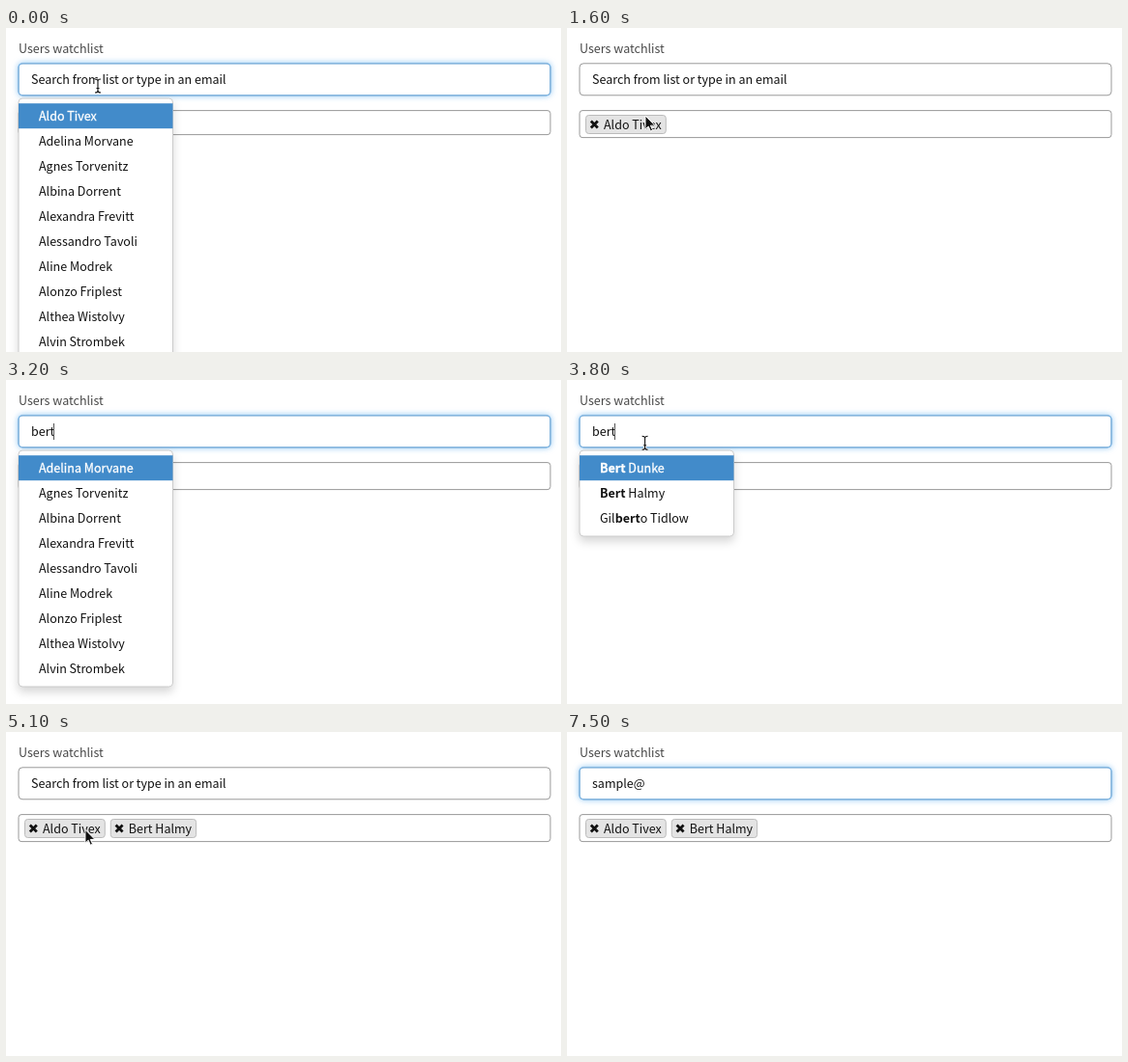
Animation, 574 px wide and 336 px high, one loop 8000 ms. Source, as an HTML page:

```html
<!DOCTYPE html>
<html lang="en">
<head>
<meta charset="utf-8">
<title>Users watchlist</title>
<style>
  html, body { margin: 0; width: 100%; height: 100%; overflow: hidden; background: #fff; }
  svg { display: block; width: 574px; height: 336px; font: 12.53px "Noto Sans CJK SC", "Noto Sans CJK JP", "Noto Sans", sans-serif; fill: #111; }
  .menu { filter: drop-shadow(0 5px 5px rgba(0, 0, 0, .16)); }
  .active text { fill: #fff; stroke: #fff; stroke-width: .3px; }
</style>
</head>
<body>
<svg id="stage" viewBox="0 0 574 336"></svg>
<script>
const LOOP = 8000, STEP = 100, ROW = 26, MENU_TOP = 78.2;
const PLACEHOLDER = 'Search from list or type in an email';
const PEOPLE = ['Aldo Tivex', 'Adelina Morvane', 'Agnes Torvenitz', 'Albina Dorrent', 'Alexandra Frevitt',
  'Alessandro Tavoli', 'Aline Modrek', 'Alonzo Friplest', 'Althea Wistolvy', 'Alvin Strombek'];
const MATCHES = ['Bert Dunke', 'Bert Halmy', 'Gilberto Tidlow'];

// Each entry: [time, value]; the value holds until the next entry.
const INPUT = [[0, ''], [2700, 'b'], [2800, 'be'], [3000, 'ber'], [3100, 'bert'], [4600, ''], [6400, 's'],
  [6800, 'sa'], [6900, 'sam'], [7000, 'samp'], [7100, 'sampl'], [7200, 'sample'], [7400, 'sample@']];
const MENU = [[0, PEOPLE], [1300, []], [2600, PEOPLE.slice(1)], [3500, MATCHES], [4600, []]];
const PILLS = [[0, []], [1300, [PEOPLE[0]]], [4600, [PEOPLE[0], MATCHES[1]]]];
const CARET = [[0, false], [2500, true], [4500, false], [5900, true], [7500, false]];
const MOUSE_SHOWN = [[0, true], [2600, false], [3700, true], [5900, false]];

// Each entry: [time, ...numbers]; numbers ease from one entry to the next.
const FOCUS = [[0, 1], [800, 1], [1100, 0], [2200, 0], [2400, 1], [4500, 1], [4700, 0], [5700, 0], [5900, 1]];
const MOUSE = [[0, 95, 60], [300, 95, 60], [800, 81, 91], [1800, 81, 91], [2300, 78, 53], [3700, 80, 60],
  [4200, 86, 110], [4900, 86, 110], [5700, 60, 54]];

const at = (track, t) => track.findLast(([start]) => start <= t)[1];

function ease(track, t) {
  const i = track.findLastIndex(([start]) => start <= t);
  const [t0, ...from] = track[i];
  const [t1, ...to] = track[i + 1] || [LOOP, ...from];
  const p = (t - t0) / (t1 - t0), k = p * p * (3 - 2 * p);
  return from.map((v, j) => v + (to[j] - v) * k);
}

const stage = document.getElementById('stage');
const pen = document.createElement('canvas').getContext('2d');
const widthOf = s => {
  pen.font = getComputedStyle(stage).font;
  return pen.measureText(s).width;
};

const text = (x, y, s, color = '#111') => `<text x="${x}" y="${y}" fill="${color}">${s}</text>`;
const box = (x, y, w, h, r, fill, stroke, extra = '') =>
  `<rect x="${x}" y="${y}" width="${w}" height="${h}" rx="${r}" fill="${fill}" stroke="${stroke}" ${extra}/>`;

function field(t, focus) {
  const value = at(INPUT, t), frame = [13, 36.8, 550, 33, 4];
  const glow = `style="filter:drop-shadow(0 0 3px rgba(82,168,236,${.7 * focus ** 2}))"`;
  let out = box(...frame, '#fff', '#999', glow) +
    box(...frame, 'none', '#7cbaee', `stroke-width="${1 + .3 * focus ** 2}" opacity="${Math.sqrt(focus)}"`) +
    text(26, 58, value || PLACEHOLDER);
  if (at(CARET, t)) out += `<path d="M${Math.floor(26 + widthOf(value)) - .5} 45v17" stroke="#555"/>`;
  return out;
}

function pills(names) {
  let x = 19, out = box(13, 85.6, 550, names.length ? 28 : 25, 3, '#fff', '#999');
  for (const name of names) {
    const w = widthOf(name) + 24;
    out += box(x + .5, 90.5, w - 1, 19, 3, '#e4e4e4', '#bbb') +
      `<path d="M${x + 5.8} 96.5l7 7m0-7l-7 7" stroke="#111" stroke-width="2.8"/>` + text(x + 19, 105, name);
    x += w + 5;
  }
  return out;
}

function menu(names, active, pressed) {
  if (!names.length) return '';
  return `<g class="menu">${box(13, 73, 159.5, names.length * ROW + 11, 4, '#fff', '#ccc')}</g>` +
    names.map((name, i) => {
      const y = MENU_TOP + i * ROW;
      const label = text(34, y + 18, name.replace(/bert/i, '<tspan font-weight="700">$&</tspan>'));
      if (i !== active) return label;
      return `<g class="active">${box(13, y, 159.5, ROW, 0, '#428bca', pressed ? '#62b0ee' : 'none')}${label}</g>`;
    }).join('');
}

const HAND = 'M-1.5 9V1.2a1.4 1.4 0 0 1 2.8 0V6c.4-.8 2.3-.7 2.6.5.5-.8 2.2-.6 2.5.6.6-.6 2-.3 2 1V11c0 2-1.2 3-1.5 5H0c-.5-2-3.5-4.5-4.3-6.3-.6-1.5 1.2-2.2 2.8-.7Z';
const ARROW = 'M0 0V14l3.2-3 2.2 5 2.2-1-2.2-4.8H10Z';
const BEAM = 'M-3-7q3 0 3 2q0-2 3-2M0-5V5M-3 7q3 0 3-2q0 2 3 2M-1.5 2.5h3';

function pointer(x, y, overMenu) {
  const shape = y < 72
    ? `<path d="${BEAM}" fill="none" stroke="#fff" stroke-width="2.6"/><path d="${BEAM}" fill="none" stroke="#111" stroke-width="1.1"/>`
    : overMenu
      ? `<path d="${HAND}" fill="#fff" stroke="#111" stroke-width="1.2" transform="scale(1.08)"/>
         <path d="M1.8 11v3.5M4.2 11v3.5M6.6 11v3.5" stroke="#111" stroke-width=".9"/>`
      : `<path d="${ARROW}" fill="#111" stroke="#fff"/>`;
  return `<g transform="translate(${x} ${y})">${shape}</g>`;
}

function scene(t) {
  const [x, y] = ease(MOUSE, t), [focus] = ease(FOCUS, t);
  const shown = at(MOUSE_SHOWN, t), names = at(MENU, t);
  const active = shown ? Math.max(0, Math.floor((y - MENU_TOP) / ROW)) : 0;
  return text(13, 26, 'Users watchlist', '#484848') + field(t, focus) + pills(at(PILLS, t)) +
    menu(names, active, focus < 1) + (shown ? pointer(x, y, names.length > 0) : '');
}

let drawn = -1;
function tick() {
  const t = Math.floor(performance.now() % LOOP / STEP) * STEP;
  if (t !== drawn) stage.innerHTML = scene(drawn = t);
  requestAnimationFrame(tick);
}
tick();
</script>
</body>
</html>
```
